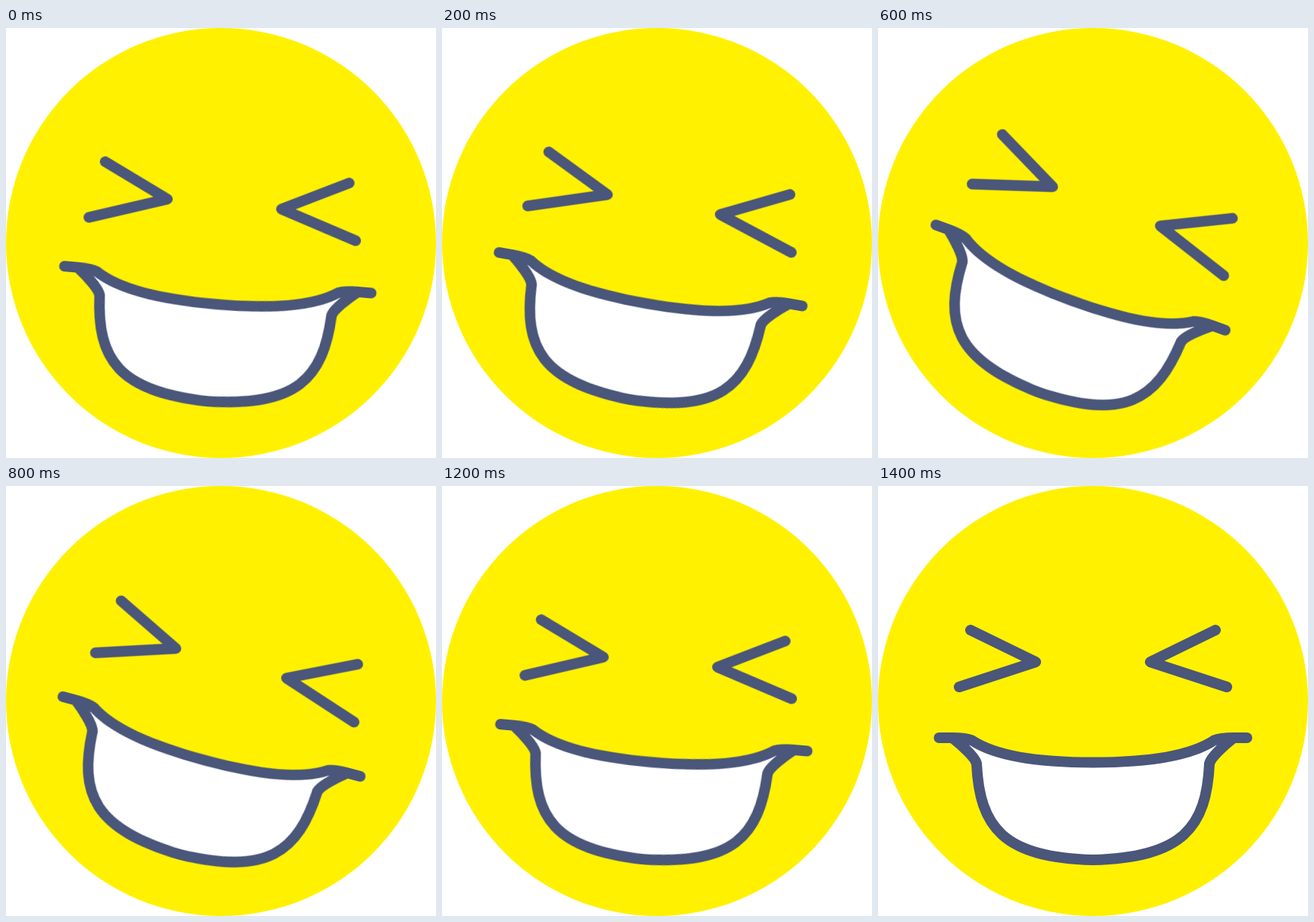
These frames come from a looping animation (567 by 567 pixels, 1.6 s). An HTML page:

```html
<!DOCTYPE html>
<html lang="en">
<head>
<meta charset="utf-8">
<title>Laughing face</title>
<style>
html, body { margin: 0; width: 100%; height: 100%; overflow: hidden; background: #fff; }
svg { display: block; width: 100%; height: 100%; }
#features {
  fill: none; stroke: #4a567a; stroke-width: 14;
  stroke-linecap: round; stroke-linejoin: round;
  transform-origin: 283.5px 284px;
}
</style>
</head>
<body>
<svg viewBox="0 0 567 567">
  <circle cx="283.5" cy="283.5" r="283.5" fill="#fff100"/>
  <g id="features">
    <path d="M122 190 208 232 107 265M445 190 359 232 460 265"/>
    <path fill="#fff" d="M98 332
      C108 332 118 333 124 335.5 C158 358 220 364.5 283.5 364.5
      C347 364.5 409 358 443 335.5 C449 333 459 332 469 332
      C455 343 439 358 437 366 C433 450 402 490 283.5 493
      C165 490 134 450 130 366 C128 358 112 343 98 332Z"/>
    <path d="M80.500 332H98M469 332H486.500"/>
  </g>
</svg>
<script>
// Tilt in degrees, each held for one step
const tilts = [5, 10, 15, 20, 15, 10, 5, 0];
const STEP = 200;

const pose = (deg, offset) => ({ transform: `rotate(${deg}deg)`, offset, easing: 'step-end' });
const frames = tilts.map((deg, i) => pose(deg, i / tilts.length));
frames.push(pose(tilts[0], 1));

document.getElementById('features').animate(frames, {
  duration: STEP * tilts.length,
  iterations: Infinity
});
</script>
</body>
</html>
```
